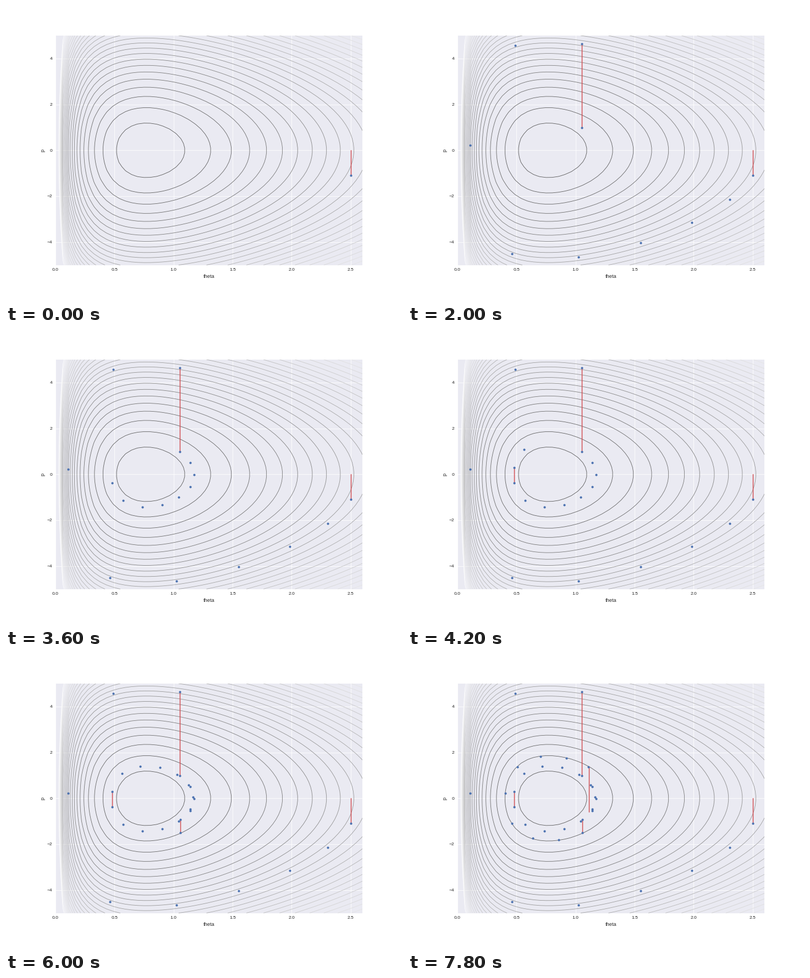
These frames come from a looping animation (720x540 px, 8 s). A matplotlib script:

```python
import numpy as np
import matplotlib.pyplot as plt
from matplotlib.animation import FuncAnimation

INK, PANEL = "0.15", "#eaeaf2"
BLUE, RED = "#4c72b0", "#d14d51"
RATE, SHAPE = 13.0, 10.0
DT, SUB, STEPS = 0.12, 120, 8
FRAMES, INTERVAL = 40, 200

plt.rcParams.update({
    "font.family": "Liberation Sans",
    "text.color": INK, "axes.labelcolor": INK,
    "xtick.color": INK, "ytick.color": INK,
    "xtick.labelsize": 10, "ytick.labelsize": 10, "axes.labelsize": 11,
    "xtick.major.size": 0, "ytick.major.size": 0,
    "xtick.major.pad": 7, "ytick.major.pad": 7,
    "axes.axisbelow": True,
})

# Start of each trajectory: position and freshly drawn momentum.
STARTS = [(2.5, -1.09), (1.053, 0.985), (0.48, 0.295), (1.058, -1.5),
          (1.115, -0.58)]


def energy(theta, p):
    return RATE * theta - SHAPE * np.log(theta) + p ** 2 / 2


def grad(theta):
    return RATE - SHAPE / theta


def flow(theta, p):
    """Leapfrog integration over one displayed step."""
    h = DT / SUB
    for _ in range(SUB):
        p -= h / 2 * grad(theta)
        theta += h * p
        p -= h / 2 * grad(theta)
    return theta, p


def sample():
    """List of events: each is a momentum jump or a visited point."""
    events, last_p = [], 0.0
    for theta, p in STARTS:
        events.append(("jump", (theta, last_p, p)))
        events.append(("dot", (theta, p)))
        for _ in range(STEPS):
            theta, p = flow(theta, p)
            events.append(("dot", (theta, p)))
        last_p = p
    return events


EVENTS = sample()

fig = plt.figure(figsize=(12, 9), dpi=60, facecolor="white")
ax = fig.add_axes([0.125, 0.125, 0.775, 0.775], facecolor=PANEL)
for side in ax.spines.values():
    side.set_visible(False)
ax.grid(color="white", linewidth=1)

T, P = np.meshgrid(np.linspace(0.01, 2.6, 50), np.linspace(-5, 5, 50))
ax.contour(T, P, energy(T, P), levels=np.linspace(0, 40, 40),
           cmap="gray", vmin=0, vmax=40, linewidths=1)

ax.set(xlim=(0, 2.6), ylim=(-5, 5), xlabel="theta", ylabel="p",
       xticks=np.arange(0, 2.6, 0.5), yticks=range(-4, 5, 2))

jumps, = ax.plot([], [], color=RED, lw=1.75, solid_capstyle="round", zorder=3)
dots, = ax.plot([], [], "o", color=BLUE, ms=5, mew=0, zorder=4)


def draw(n):
    seen = EVENTS[:n + 2]
    xs, ys = [], []
    for kind, data in seen:
        if kind == "jump":
            theta, p0, p1 = data
            xs += [theta, theta, np.nan]
            ys += [p0, p1, np.nan]
    jumps.set_data(xs, ys)
    pts = np.array([data for kind, data in seen if kind == "dot"])
    dots.set_data(pts[:, 0], pts[:, 1])
    return jumps, dots


anim = FuncAnimation(fig, draw, frames=FRAMES, interval=INTERVAL,
                     repeat=True, repeat_delay=0)
plt.show()
```
